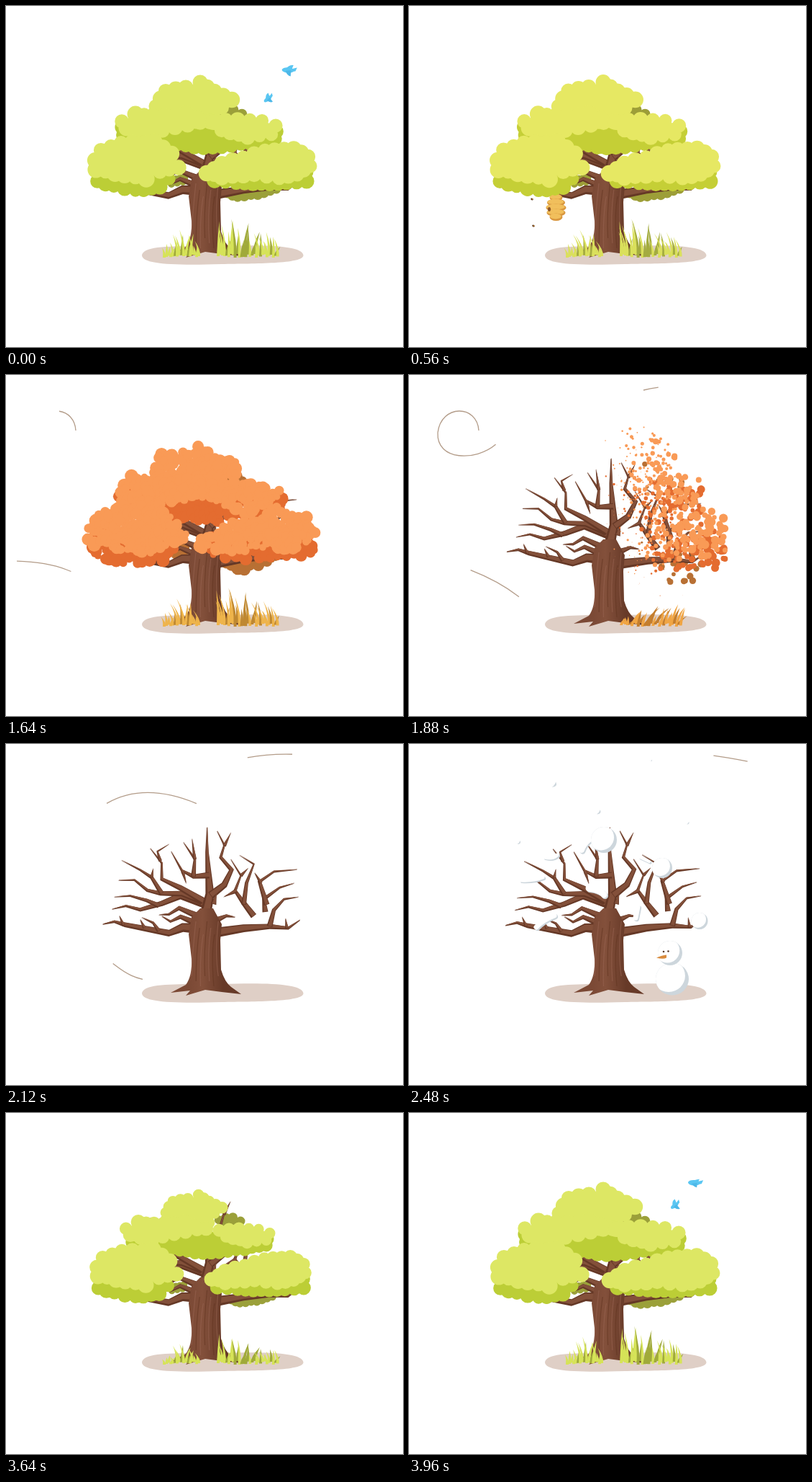
These frames come from a looping animation (552x473 px, 4 s). An HTML page with a canvas:

```html
<!DOCTYPE html>
<html lang="en">
<head>
<meta charset="utf-8">
<title>Tree through the seasons</title>
<style>
html, body { margin: 0; width: 100%; height: 100%; overflow: hidden; background: #fff; }
canvas { display: block; width: 552px; height: 473px; }
</style>
</head>
<body>
<canvas id="stage"></canvas>
<script>
const W = 552, H = 473, LOOP = 4000, STEP = 40, LEAF_OFF = 1640;
const canvas = document.getElementById('stage');
const ctx = canvas.getContext('2d');
const ratio = window.devicePixelRatio || 1;
canvas.width = W * ratio;
canvas.height = H * ratio;

let seed = 7;
const rand = () => (seed = (seed * 16807) % 2147483647) / 2147483647;
const clamp = v => Math.max(0, Math.min(1, v));
const lerp = (a, b, k) => a + (b - a) * k;
const ramp = (t, a, b) => clamp((t - a) / (b - a));
const smooth = k => k * k * (3 - 2 * k);
const easeOut = k => 1 - (1 - k) ** 3;
const backOut = k => 1 + 2.4 * (k - 1) ** 3 + 1.4 * (k - 1) ** 2;
const points = s => s.split(' ').map(p => p.split(',').map(Number));

// Interpolates a number or colour between timed stops.
function key(t, stops) {
  let i = 0;
  while (i < stops.length - 2 && t > stops[i + 1][0]) i++;
  const [t0, a] = stops[i], [t1, b] = stops[i + 1], k = ramp(t, t0, t1);
  return Array.isArray(a) ? a.map((v, n) => lerp(v, b[n], k)) : lerp(a, b, k);
}
const rgb = c => `rgb(${c.map(Math.round)})`;

const TONES = {
  light: [[0, [221, 231, 100]], [560, [230, 232, 99]], [1360, [238, 211, 98]], [1640, [249, 154, 86]]],
  dark: [[0, [188, 206, 54]], [560, [197, 207, 54]], [1360, [204, 184, 54]], [1640, [228, 108, 48]]],
  back: [[0, [155, 160, 58]], [560, [157, 158, 56]], [1360, [166, 143, 56]], [1640, [184, 112, 52]]],
  blade: [[0, [214, 227, 88]], [560, [218, 224, 92]], [1360, [234, 216, 92]], [1760, [240, 165, 68]]],
  shade: [[0, [160, 170, 58]], [560, [164, 172, 64]], [1360, [178, 158, 56]], [1760, [196, 126, 46]]]
};
const tone = (name, t) => rgb(key(t > 3000 ? 0 : t, TONES[name]));

function ellipse(x, y, rx, ry, fill, turn = 0) {
  ctx.fillStyle = fill;
  ctx.beginPath();
  ctx.ellipse(x, y, Math.max(0, rx), Math.max(0, ry), turn, 0, 7);
  ctx.fill();
}
function shape(d, fill) {
  ctx.fillStyle = fill;
  ctx.fill(new Path2D(d));
}

// A leafy mass: filled outline with round bumps along its edge.
function cloud(name, outline, r, delay) {
  const pts = points(outline), path = new Path2D();
  pts.forEach(([x, y], i) => i ? path.lineTo(x, y) : path.moveTo(x, y));
  path.closePath();
  pts.forEach(([x, y], i) => {
    const [u, v] = pts[(i + 1) % pts.length];
    const n = Math.max(1, Math.round(Math.hypot(u - x, v - y) / (r * 1.35)));
    for (let j = 0; j < n; j++) {
      const px = lerp(x, u, j / n), py = lerp(y, v, j / n), q = r * lerp(.86, 1.08, rand());
      path.moveTo(px + q, py);
      path.arc(px, py, q, 0, Math.PI * 2);
    }
  });
  const xs = pts.map(p => p[0]), ys = pts.map(p => p[1]);
  const box = [Math.min(...xs) - r, Math.min(...ys) - r, Math.max(...xs) + r, Math.max(...ys) + r];
  return { name, path, box, delay, cx: (box[0] + box[2]) / 2, cy: (box[1] + box[3]) / 2 };
}

const backClouds = [
  cloud('back', '294,148 316,144 328,150 318,156', 8, 60),
  cloud('back', '308,260 350,254 376,254 350,262 322,265', 7, 80),
  cloud('back', '230,240 248,238 246,244 230,247', 5, 40)
];
const frontClouds = [
  cloud('dark', '162,168 250,172 376,174 374,184 340,190 300,196 262,196 226,190 190,183 163,179', 10, 60),
  cloud('light', '208,139 222,118 250,113 270,106 290,118 314,130 300,141 290,158 212,164', 10.5, 110),
  cloud('light', '161,160 180,150 204,152 250,150 284,160 270,162 235,168 200,178 168,169', 11, 50),
  cloud('light', '288,161 322,158 356,159 375,166 369,178 336,182 300,172', 10.5, 90),
  cloud('dark', '127,228 220,222 227,240 214,251 180,256 150,250 127,243', 10, 0),
  cloud('light', '124,214 132,200 160,190 206,188 230,205 240,224 214,230 195,240 165,235 125,227', 11, 20),
  cloud('dark', '286,232 350,225 418,230 418,243 390,246 355,247 320,246 290,242', 10, 30),
  cloud('light', '279,232 300,219 330,210 360,200 400,198 420,209 423,222 405,234 380,238 345,234 300,238', 10.5, 50)
];

const leaves = [];
for (const c of [...backClouds, ...frontClouds]) {
  const [x0, y0, x1, y1] = c.box;
  for (let x = x0; x < x1; x += 7.5) for (let y = y0; y < y1; y += 7.5) {
    const px = x + rand() * 7, py = y + rand() * 7;
    const leaf = { name: c.name, x: px, y: py, r: lerp(4.5, 9.5, rand()), a: rand(), b: rand() - .5 };
    if (ctx.isPointInPath(c.path, px, py)) leaves.push(leaf);
  }
}

function drawClouds(list, t) {
  if (t >= LEAF_OFF && t < 3400) return;
  for (const c of list) {
    const grow = t >= 3400 ? easeOut(ramp(t, 3410 + c.delay, 3740 + c.delay)) : 1 + .012 * ramp(t, 0, 560);
    if (grow <= 0) continue;
    ctx.save();
    ctx.translate(c.cx, c.cy);
    ctx.scale(grow, grow);
    ctx.translate(-c.cx, -c.cy);
    ctx.fillStyle = tone(c.name, t);
    ctx.fill(c.path);
    ctx.restore();
  }
}

// The gust strips leaves from left to right.
function drawLeaves(t, back) {
  if (t < LEAF_OFF || t > 2250) return;
  for (const l of leaves) {
    if ((l.name === 'back') !== back) continue;
    const d = l.x - 112, start = LEAF_OFF + d * .45;
    const u = ramp(t, start, start + 170 + d * .5);
    if (u >= 1) continue;
    const x = l.x + u * u * lerp(90, 200, l.a) + l.b * 30 * u;
    const y = l.y + l.b * 80 * u + (l.y - 190) * u * .25;
    ellipse(x, y, l.r * (1 - u), l.r * (1 - u), tone(l.name, t));
  }
}

const LEFT = [
  '15 270,256 245,255 226,263 165,252 150,248 134,252', '5 163,253 157,240', '6 212,260 204,249 188,242',
  '5 192,256 186,245', '9 262,248 242,240 228,247 216,240', '9 264,238 240,228 226,237 212,238',
  '12 276,222 242,211 216,222 186,231 166,226 147,231', '7 212,225 195,218 172,212 150,214',
  '10 272,218 244,208 214,208 196,204 178,190 156,191', '7 216,208 202,186 186,176 160,163',
  '10 274,218 242,200 216,188 216,166 200,146', '5 214,163 210,150 226,140', '5 202,186 204,174'
];
const CENTRE = [
  '16 276,240 283,208 281,180 279,150 279,116', '11 284,210 303,195 313,174 298,157 303,140 293,121',
  '5 303,141 312,123', '9 282,182 260,184 244,176 229,150', '7 260,184 262,160 246,137', '5 262,160 258,132',
  '5 245,177 250,194', '8 288,222 292,208'
];
const RIGHT = [
  '14 288,262 330,255 366,252 392,254 408,243', '8 292,244 306,238 318,240', '9 344,238 330,220 318,203 326,182 312,160',
  '7 330,222 334,192 344,166 324,154', '6 320,203 302,212', '8 366,252 372,229 386,214 406,211',
  '8 360,232 358,214 380,198 400,192', '8 362,222 352,190 372,176 404,173', '5 354,192 345,178', '5 326,182 336,172', '5 390,254 388,241'
];
const branches = [...LEFT, ...CENTRE, ...RIGHT].map(s => {
  const cut = s.indexOf(' ');
  return { w: +s.slice(0, cut), pts: points(s.slice(cut + 1)) };
});

function taper(pts, w, fill) {
  const n = pts.length - 1, a = [], b = [];
  pts.forEach(([x, y], i) => {
    const p = pts[Math.max(0, i - 1)], q = pts[Math.min(n, i + 1)];
    const len = Math.hypot(q[0] - p[0], q[1] - p[1]), h = w / 2 * (1 - i / n * .94);
    const nx = (p[1] - q[1]) / len * h, ny = (q[0] - p[0]) / len * h;
    a.push([x + nx, y + ny]);
    b.unshift([x - nx, y - ny]);
  });
  ctx.fillStyle = fill;
  ctx.beginPath();
  [...a, ...b].forEach(p => ctx.lineTo(...p));
  ctx.fill();
}

function drawTree(t) {
  const bend = 6.5 * Math.sin(Math.PI * ramp(t, 1680, 2160));
  const bare = t >= LEAF_OFF && t < 3640;
  for (const { w, pts } of branches) {
    if (!bare && pts.some(p => p[0] > 386 && p[1] < 200)) continue;
    const bent = pts.map(([x, y]) => [x + bend * .3, y + bend * (x - 275) / 140]);
    taper(bent, w, '#653826');
    taper(bent.map(([x, y]) => [x + .4, y - .8]), w * .62, '#83503a');
  }
  const wood = ctx.createLinearGradient(254, 0, 302, 0);
  wood.addColorStop(0, '#7b4935');
  wood.addColorStop(.4, '#83503b');
  wood.addColorStop(1, '#673a28');
  shape('M229 345L250 334Q259 322 258 298L254 264L258 240L270 228H288L300 250L298 272L299 313Q304 330 313 337L327 347L300 344L277 341L250 349L256 342Z', wood);
  ctx.lineWidth = 1.2;
  for (let i = 0; i < 7; i++) {
    const x = 262 + i * 5.2;
    ctx.strokeStyle = i % 2 ? '#623522' : '#976451';
    ctx.globalAlpha = .6;
    ctx.stroke(new Path2D(`M${x + 2} ${246 + i % 3 * 9}Q${x - 3} 290 ${x + i - 4} ${322 + i % 3 * 7}`));
  }
  ctx.globalAlpha = 1;
}

const grass = [];
for (let i = 0; i < 46; i++) {
  const left = i < 17;
  const x = left ? 220 + i * 3 : 295 + (i - 17) * 2.95;
  const mid = left ? 1 - Math.abs(x - 249) / 34 : 1 - Math.max(0, x - 325) / 80;
  grass.push({ x, y: 344 + rand() * 5, h: (14 + (left ? 30 : 40) * mid) * lerp(.4, 1, rand()), lean: (rand() - .45) * 14, dark: rand() < .36, lag: rand() * 100 });
}
function drawGrass(t) {
  const wind = t > 3000 ? 0 : key(t, [[0, 0], [560, -4], [1360, -8], [1640, -4], [1880, 13], [2100, 16]]);
  for (const g of grass) {
    const start = LEAF_OFF + (g.x - 220) * 1.5;
    const k = t > 3000 ? easeOut(ramp(t, 3480 + g.lag, 3820 + g.lag)) : 1 - ramp(t, start, start + 160);
    if (k <= 0) continue;
    const h = g.h * k, tip = g.x + g.lean + wind * Math.min(1, h / 30), top = g.y - h;
    shape(`M${g.x - 2} ${g.y}Q${g.x - 1} ${g.y - h * .5} ${tip} ${top}Q${g.x + 3} ${g.y - h * .4} ${g.x + 2} ${g.y}Z`, tone(g.dark ? 'shade' : 'blade', t));
  }
}

function drawBird(x, y, size, turn, t) {
  const flap = Math.sin(t / 40 * 1.7);
  ctx.save();
  ctx.translate(x, y);
  ctx.rotate(turn);
  ctx.scale(size, size);
  ellipse(0, 0, 8, 3.6, '#5ac6f2');
  shape(`M5 -2L12 -4L10 1L5 2ZM-3 -1Q0 ${-7 - 3 * flap} 7 ${-7 - 2 * flap}Q6 -2 3 1Z`, '#5ac6f2');
  shape(`M-3 1Q-1 ${7 + flap * 2} 4 ${8 + flap * 2}L4 0Z`, '#4db8e8');
  ctx.restore();
}
function drawBirds(t) {
  const s = t > 2000 ? t - LOOP : t;
  if (s < -250 || s > 320) return;
  drawBird(392 - .125 * s - .0004 * s * s, 89 - .15 * s + .0011 * s * s, 1.05, .05, t);
  if (s < 190) drawBird(364 - .15 * s - .0004 * s * s, 129 + .05 * s + .0009 * s * s, .8, -.65, t + 60);
}

function drawHive(t) {
  const k = backOut(ramp(t, 200, 460)) * (1 - smooth(ramp(t, 1420, 1620)));
  if (t < 200 || k <= 0) return;
  ctx.save();
  ctx.translate(204.5, 262);
  ctx.scale(k, k * lerp(1, .94, ramp(t, 560, 1360)));
  [[3, 9], [10, 12.5], [17, 14], [24, 13], [30, 9]].forEach(([y, r]) => {
    ellipse(0, y + .8, r, 5.2, '#d9973f');
    ellipse(-.8, y - .4, r - 1, 3.8, '#f1bf5c');
  });
  ellipse(-9.5, 20, 2, 3, '#8a5426');
  ctx.restore();
}
function drawBee(x, y) {
  ellipse(x, y, 1.8, 1.3, '#5a3218', .4);
  ellipse(x + .6, y, .6, .9, '#c98a2c');
}
function drawBees(t) {
  if (t < 440 || t > 1480) return;
  const k = (t - 560) / 800, a = Math.sin(Math.PI * 2 * k), b = Math.sin(Math.PI * 4 * k);
  drawBee(171 - 29 * k + 18 * a, 268 + 22 * k + 12 * b);
  if (t < 1300) drawBee(173 + 31 * k - 18 * a, 305 - 25 * k + 9 * b);
}

const gusts = [
  { d: 'M97 77C95 41 45 40 40 80C38 120 95 120 122 95C170 55 230 60 300 100', from: t => Math.max(0, t - 1880) * .9, to: t => (t - 1580) * .64, end: 390 },
  { d: 'M0 258C30 258 58 260 84 270S130 290 152 307S185 325 196 328', from: t => Math.max(0, t - 1590) * .3, to: t => 8 + (t - 1360) * .3, end: 206 },
  { d: 'M326 21C350 15 390 12 423 16S510 32 552 44', from: t => 98 * (Math.max(0, t - 1990) / 490) ** 1.72, to: t => 146 * (Math.max(0, t - 1790) / 690) ** .95, end: 232 }
];
function drawWind(t) {
  ctx.strokeStyle = '#b39c89';
  ctx.lineWidth = 1.3;
  for (const g of gusts) {
    const from = g.from(t), len = Math.min(g.to(t), g.end) - from;
    if (len <= 0 || t > 2800) continue;
    ctx.setLineDash([len, 2000]);
    ctx.lineDashOffset = -from;
    ctx.save();
    ctx.beginPath();
    ctx.stroke(new Path2D(g.d));
    ctx.restore();
    ctx.setLineDash([]);
  }
}
// The first dash starts at the path start, so the offset hides everything before it.

const SHADE = '#cdd6dc';
function snowball(x, y, rx, ry = rx) {
  if (rx <= 0 || ry <= 0) return;
  ellipse(x, y, rx, ry, SHADE);
  ctx.save();
  ctx.clip(ellipsePath(x, y, rx, ry));
  ellipse(x - rx * .22, y - ry * .2, rx, ry, '#fff');
  ctx.restore();
}
function ellipsePath(x, y, rx, ry) {
  const p = new Path2D();
  p.ellipse(x, y, rx, ry, 0, 0, Math.PI * 2);
  return p;
}

const drifts = [
  ['M156 189Q172 190 186 185', 5], ['M177 254Q186 244 202 238', 7], ['M189 157Q199 160 206 154', 5],
  ['M240 147Q243 138 251 132', 8], ['M250 200Q266 202 271 209', 9], ['M318 226L315 241', 7], ['M321 157L334 163', 4]
].map(([d, w]) => [new Path2D(d), w]);
function drawSnow(t) {
  if (t < 2260 || t > 3400) return;
  const k = key(t, [[2260, 0], [2460, 1], [2840, 1], [3200, .62], [3380, 0]]);
  if (k <= 0) return;
  ctx.lineCap = 'round';
  for (const [path, w] of drifts) for (const [color, shift] of [[SHADE, 1.6], ['#fff', 0]]) {
    ctx.save();
    ctx.translate(shift * k, shift * k);
    ctx.strokeStyle = color;
    ctx.lineWidth = w * k;
    ctx.stroke(path);
    ctx.restore();
  }
  ctx.lineCap = 'butt';
  [[271, 151, 18], [352, 186, 14], [404, 257, 11.5]].forEach(([x, y, r]) => snowball(x, y - r * k, r * k));
}

const flakes = points('202,57 264,95 153,137 388,110 337,23').map(([x, y], i) => ({ x, y, r: 4.4 - i * .7, at: 2480 }));
for (let i = 0; i < 15; i++) flakes.push({ x: 145 + rand() * 255, y: -5, r: 2 + rand() * 3, at: 2490 + i * 25 });
function drawFlakes(t) {
  if (t < 2280 || t > 3300) return;
  for (const f of flakes) {
    const y = f.y + (t - f.at) * .38, r = f.r * (1 - ramp(y, 150, 235));
    if (y < -6 || r < .2) continue;
    const x = f.x + Math.sin(y / 40) * 3 - Math.sin(f.y / 40) * 3;
    shape(`M${x + r * .5} ${y - r}Q${x + r * 1.2} ${y + r * .6} ${x - r * .8} ${y + r * .7}Q${x + r * .1} ${y + r * .2} ${x + r * .5} ${y - r}Z`, SHADE);
  }
}

function drawSnowman(t) {
  if (t < 2280 || t > 3400) return;
  const pop = backOut(ramp(t, 2280, 2460)), m = smooth(ramp(t, 2860, 3190)), gone = 1 - ramp(t, 3220, 3380);
  const k = pop * gone;
  if (k <= 0) return;
  ctx.save();
  ctx.translate(365, 347);
  ctx.scale(k, k);
  ctx.translate(-365, -347);
  snowball(lerp(366, 360, m), lerp(326, 342, m), lerp(23, 30.5, m), lerp(22.5, 5.5, m));
  snowball(lerp(363, 366, m), lerp(290, 338, m), lerp(17, 24, m), lerp(17, 4.5, m));
  ellipse(lerp(354, 366, m), lerp(288, 337, m), 1.3, 1.3, '#5b3b2a');
  ellipse(lerp(360.5, 379, m), lerp(287.5, 335, m), 1.3, 1.3, '#5b3b2a');
  ctx.translate(lerp(358, 356, m), lerp(294, 337, m));
  ctx.rotate(m * 1.1);
  ctx.scale(lerp(1, .6, m), 1);
  shape('M0 -1.5Q-6 -1 -14 2.5Q-4 5 0 2.5Z', '#d98b3d');
  ctx.restore();
}

function draw(t) {
  ctx.setTransform(ratio, 0, 0, ratio, 0, 0);
  ctx.fillStyle = '#fff';
  ctx.fillRect(0, 0, W, H);
  shape('M189 346C190 331 240 333 300 333C360 331 413 332 413.500 346C413 358 345 357 300 358C230 360 190 358 189 346Z', '#dfcfc6');
  drawBirds(t);
  drawClouds(backClouds, t);
  drawLeaves(t, true);
  drawTree(t);
  drawHive(t);
  drawClouds(frontClouds, t);
  drawLeaves(t, false);
  drawGrass(t);
  drawSnow(t);
  drawSnowman(t);
  drawFlakes(t);
  drawBees(t);
  drawWind(t);
}

const begin = performance.now();
function tick() {
  const t = (performance.now() - begin) % LOOP;
  draw(Math.floor(t / STEP) * STEP);
  requestAnimationFrame(tick);
}
tick();
</script>
</body>
</html>
```
